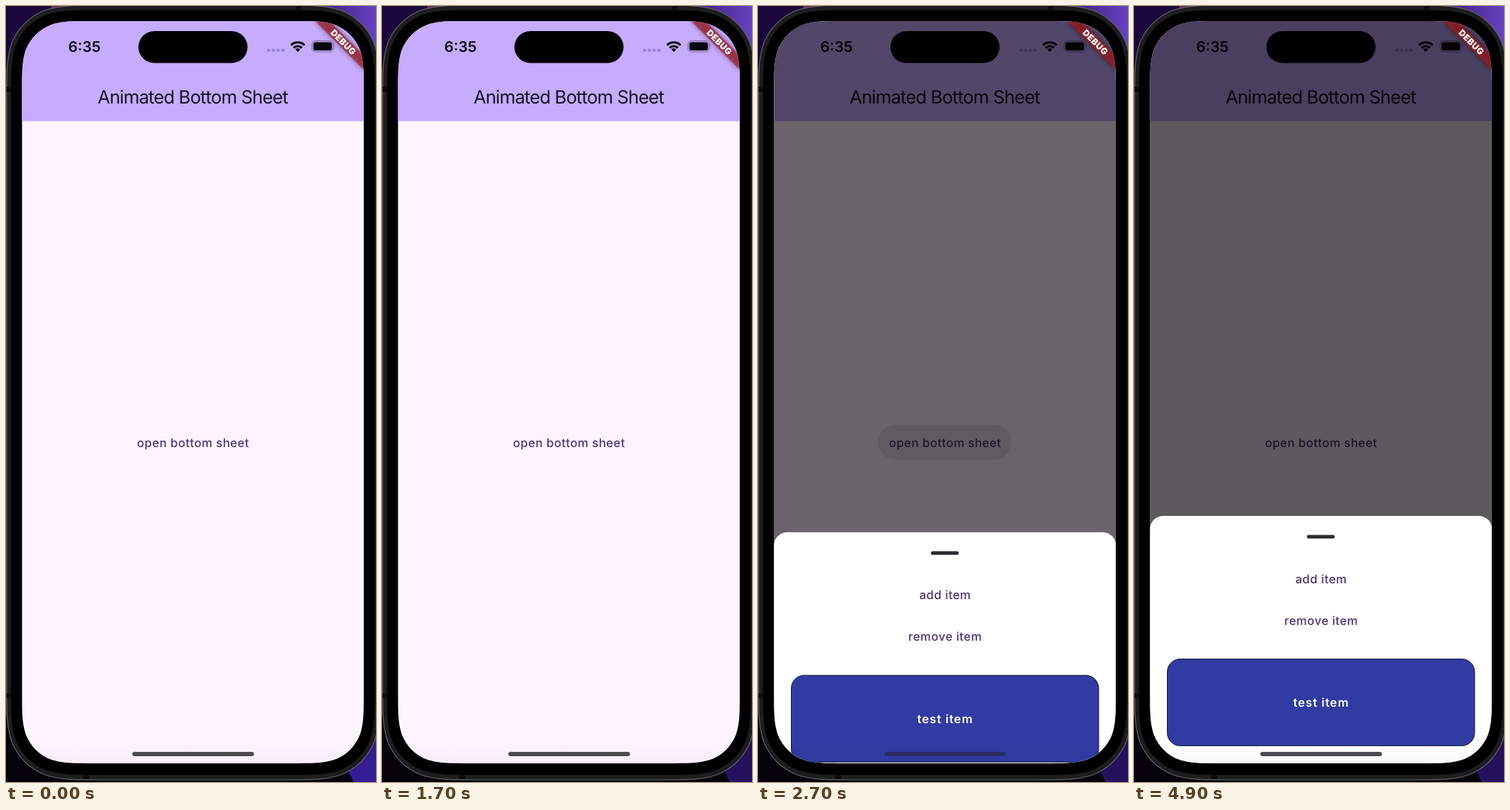
An HTML page for the animation above (5000 ms loop, 517 by 1082 pixels).

```html
<!DOCTYPE html>
<html lang="en">
<head>
<meta charset="utf-8">
<title>Animated Bottom Sheet</title>
<style>
  html, body { margin: 0; width: 100%; height: 100%; overflow: hidden; background: #000; }
  svg { display: block; width: 100vw; height: 100vh; }
  text { font-family: Inter, Roboto, sans-serif; text-rendering: geometricPrecision; }
  .label { font-size: 16.65px; font-weight: 500; letter-spacing: .43px; text-anchor: middle; fill: #4a3575; }
</style>
</head>
<body>
<svg viewBox="0 0 517 1082">
  <defs>
    <clipPath id="screenClip"><path id="clipShape"/></clipPath>
    <clipPath id="pillClip"><rect x="168" y="584" width="186" height="48.5" rx="24.2"/></clipPath>
    <filter id="blur" x="-30%" y="-30%" width="160%" height="160%"><feGaussianBlur stdDeviation="3"/></filter>
    <linearGradient id="topRight">
      <stop offset="0.2" stop-color="#321878"/><stop offset="1" stop-color="#6742c2"/>
    </linearGradient>
    <linearGradient id="lowShade" x1="0" y1="0" x2="0" y2="1">
      <stop offset="0" stop-opacity="0"/><stop offset="1" stop-opacity=".025"/>
    </linearGradient>
  </defs>

  <!-- desktop behind the phone -->
  <rect width="517" height="1082" fill="#05020c"/>
  <rect width="110" height="120" fill="#1a073b"/>
  <rect x="63" width="20" height="4" fill="#6d2762"/>
  <rect x="400" width="117" height="120" fill="url(#topRight)"/>
  <path d="M517 960V1082H486L460 1030V960Z" fill="#25125f"/>
  <path id="glow" d="M517 960V1082H486L460 1030V960Z" fill="#3a20a4"/>

  <!-- phone body -->
  <path id="rim" fill="#1d1d1f" stroke="#66666a" stroke-width="1.2"/>
  <path d="M1 113h6v7h-6zM1 958h6v7h-6zM405 0h7v6h-7zM108 1072h8v6h-8z" fill="#0d0d0f"/>
  <path id="bezel" fill="#000"/>

  <g clip-path="url(#screenClip)">
    <rect x="22" y="21" width="478.500" height="1035.500" fill="#fef4ff"/>
    <rect x="22" y="21" width="478.500" height="139.500" fill="#c7abff"/>
    <text x="260.800" y="136" font-size="25.500" letter-spacing="-.87" text-anchor="middle" fill="#171320">Animated Bottom Sheet</text>

    <g clip-path="url(#pillClip)">
      <rect id="highlight" x="168" y="584" width="186" height="49" fill="#4a3575"/>
      <circle id="splash" cx="259" cy="608" fill="#4a3575"/>
    </g>
    <text class="label" x="261.500" y="614.500">open bottom sheet</text>

    <text x="87" y="64" font-size="20.500" font-weight="600" fill="#0c0a12">6:35</text>
    <g id="dots" fill="#9a83cc"></g>
    <g fill="none" stroke="#08060c" stroke-width="3">
      <path d="M398.300 54.600A13.700 13.700 0 0 1 417.200 54.600"/>
      <path d="M401.900 58.300A8.600 8.600 0 0 1 413.600 58.300"/>
    </g>
    <path d="M404.300 60.500A5 5 0 0 1 411.200 60.500L407.750 64Z" fill="#08060c"/>
    <rect x="427.600" y="48.600" width="29.800" height="15.300" rx="5" fill="none" stroke="#806ca8" stroke-width="1.200"/>
    <rect x="429.500" y="50.500" width="26" height="11.500" rx="3.300" fill="#08060c"/>
    <path d="M458.700 53.500q2 2.700 0 5.400z" fill="#806ca8"/>

    <rect id="scrim" x="22" y="21" width="478.500" height="1035.500"/>

    <g id="sheet">
      <rect x="22" y="711" width="478.500" height="420" rx="19" fill="#fff"/>
      <rect x="241.500" y="737.500" width="39" height="5" rx="2.500" fill="#2c2b30"/>
      <text class="label" x="261.500" y="804.500">add item</text>
      <text class="label" x="261.500" y="862.500">remove item</text>
      <rect x="46.500" y="910.500" width="429.500" height="121" rx="18" fill="#303ca3" stroke="#15162f"/>
      <text class="label" x="261.500" y="977" style="font-weight:600;letter-spacing:.95px;fill:#fff">test item</text>
    </g>

    <rect x="22" y="1022" width="479" height="35" fill="url(#lowShade)"/>
    <rect id="home" x="176.500" y="1040" width="170" height="6" rx="3"/>

    <path d="M432 21H452L500.500 69.500V89.500Z" fill="#000" opacity=".5" filter="url(#blur)"/>
    <path d="M432 21H452L500.500 69.500V89.500Z" fill="#b71c1c" fill-opacity=".63"/>
    <text transform="translate(471.500 50.500) rotate(45)" y="4.400" font-size="12.100" font-weight="900" letter-spacing=".45" text-anchor="middle" fill="#fff">DEBUG</text>
  </g>
  <rect x="185" y="35" width="152.500" height="44.500" rx="22.200"/>
</svg>

<script>
const LOOP = 5000, STEP = 100;
const PRESS = 2470, OPEN = 2600, OPEN_TIME = 150, SHEET_H = 345;
const $ = id => document.getElementById(id);
const set = (id, attrs) => { for (const k in attrs) $(id).setAttribute(k, attrs[k]); };
const ramp = (t, a, b) => Math.min(1, Math.max(0, (t - a) / (b - a)));

// Rounded rectangle with continuous corners; each corner is three cubics
function squircle(l, t, r, b, radius) {
  const edge = [1.528, 1.088, 0.868, 0.631, 0.372, 0.169, 0.075, 0, 0, 0];
  const n = edge.length - 1;
  const corner = (x, y, sx, sy, flip) => edge.map((_, i) => {
    const k = flip ? n - i : i;
    return `${x + sx * edge[k] * radius} ${y + sy * edge[n - k] * radius}`;
  });
  return [
    corner(l, t, 1, 1, true), corner(r, t, -1, 1, false),
    corner(r, b, -1, -1, true), corner(l, b, 1, -1, false)
  ].map(([first, ...rest], i) => `${i ? "L" : "M"}${first}C${rest.join(" ")}`).join("") + "Z";
}

// cubic-bezier(0, 0, .2, 1), solved by bisection
function decelerate(x) {
  if (x <= 0 || x >= 1) return x <= 0 ? 0 : 1;
  let lo = 0, hi = 1;
  for (let i = 0; i < 24; i++) {
    const s = (lo + hi) / 2;
    if (0.6 * (1 - s) * s * s + s ** 3 < x) lo = s; else hi = s;
  }
  return 3 * (1 - lo) * lo * lo + lo ** 3;
}

function build() {
  set("rim", { d: squircle(0.8, -1, 521.6, 1079, 87) });
  set("bezel", { d: squircle(7, 6, 515.3, 1072, 80) });
  set("clipShape", { d: squircle(22.4, 21, 499.9, 1056, 65.4) });
  $("dots").innerHTML = [0, 1, 2, 3].map(i =>
    `<rect x="${365 + i * 6.6}" y="59.500" width="4.200" height="4.200" rx="1.500"/>`).join("");
}

function draw(t) {
  const open = decelerate((t - OPEN) / OPEN_TIME);
  const fade = 1 - ramp(t, OPEN, OPEN + 200);
  const press = ramp(t, PRESS, OPEN);

  set("highlight", { opacity: 0.125 * press * fade });
  set("splash", {
    r: 20 + 69 * press + 25 * ramp(t, OPEN, OPEN + 100),
    opacity: 0.1 * press * fade
  });
  set("scrim", { opacity: 0.63 * open });
  set("sheet", {
    transform: `translate(0 ${SHEET_H * (1 - open)})`,
    visibility: open > 0 ? "visible" : "hidden"
  });
  set("home", { fill: open > 0 && open < 1 ? "#2b2c62" : "#4d4b50" });
  set("glow", { opacity: 0.8 * (1 - ramp(t, 1000, 1700)) });
}

build();
const start = performance.now();
function tick() {
  const t = (performance.now() - start) % LOOP;
  draw(Math.floor(t / STEP) * STEP);
  requestAnimationFrame(tick);
}
tick();
</script>
</body>
</html>
```
